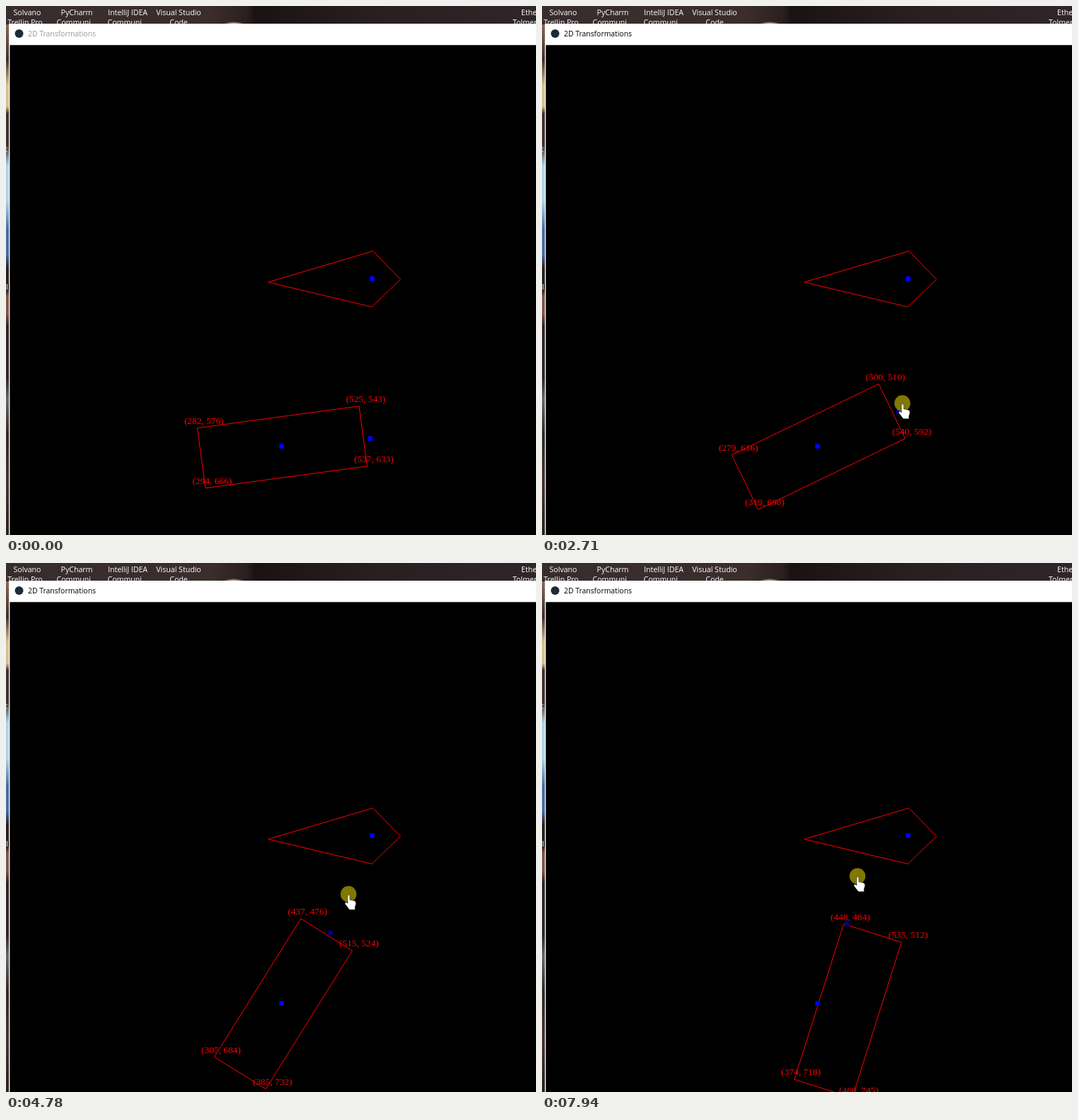
Recreate the animation shown at these times as an HTML page. Size 749 by 748 pixels, loop 8000 ms.

```html
<!DOCTYPE html>
<html lang="en">
<head>
<meta charset="utf-8">
<title>2D Transformations</title>
<style>
  html, body { margin: 0; width: 100%; height: 100%; overflow: hidden; background: #000; }
  #stage { position: relative; width: 749px; height: 748px; overflow: hidden; background: #000; }
  #desk {
    position: absolute; inset: 0 0 auto 0; height: 26px;
    background:
      radial-gradient(ellipse 16px 5px at 322px 27px, #f0dab6 30%, #f0dab600),
      linear-gradient(90deg, #382d2e, #3a2d2c 290px, #2b201f 340px, #191213 352px, #291f21 520px, #30262a);
  }
  #edge {
    position: absolute; left: 0; top: 26px; width: 4px; bottom: 0;
    background: linear-gradient(#8a6658, #40302c 50px, #d8c092 86px 116px, #40302c 126px 170px,
      #b0d4e6 200px 250px, #4a6ca0 290px 325px, #2a2222 345px 375px, #80564a 384px 410px,
      #30262a 426px 500px, #6c666a 530px, #33292a 580px, #463632 650px, #2c2220);
  }
  svg { position: absolute; left: 0; top: 0; display: block; }
  .ui { font: 10.6px "Open Sans", "Noto Sans", sans-serif; fill: #fff; }
  .mid { text-anchor: middle; }
  #title { font-size: 10.4px; animation: focus 8s step-end infinite; }
  @keyframes focus { 0% { fill: #999; } 13.75% { fill: #000; } }
  .line { fill: none; stroke: #f00; stroke-width: 1; }
  .label { font: 13.4px "Liberation Serif", "Times New Roman", serif; fill: #f00; text-anchor: middle; }
  .dot { fill: #00f; }
</style>
</head>
<body>
<div id="stage">
  <div id="desk"></div>
  <div id="edge"></div>
  <svg width="749" height="748" viewBox="0 0 749 748">
    <defs><rect id="dot" x="-3.25" y="-3.25" width="6.5" height="6.5"/></defs>
    <g class="ui">
      <g class="mid">
        <text x="30" y="13">Solvano</text><text x="27" y="27">Trellin Pro</text>
        <text x="100" y="13">PyCharm</text><text x="100" y="27">Communi...</text>
        <text x="172" y="13">IntelliJ IDEA</text><text x="172" y="27">Communi...</text>
        <text x="244" y="13">Visual Studio</text><text x="244" y="27">Code</text>
      </g>
      <text x="728" y="13">Ethe</text><text x="716" y="27">Tolmera</text>
      <text x="-3" y="206">c</text><text x="0" y="401">I</text>
    </g>
    <path fill="#fff" d="M4 25H749V55.6H5.6V748H4Z"/>
    <path d="M5.6 55.6H749V748H5.6Z"/>
    <circle cx="18.5" cy="39" r="6" fill="#1d2b3a"/>
    <text id="title" class="ui" x="31" y="43">2D Transformations</text>

    <g transform="translate(.5 .5)">
      <path class="line" d="M370 390L518 346L557 386L516.5 425Z"/>
      <use class="dot" href="#dot" x="517" y="385"/>
      <path id="box" class="line"/>
      <g id="labels"></g>
      <use class="dot" href="#dot" x="389" y="622"/>
      <use id="knob" class="dot" href="#dot"/>
    </g>
    <g id="mouse">
      <circle r="11.3" fill="#fff000" fill-opacity=".5"/>
      <path fill="#fff" stroke="#000" stroke-width=".5"
        d="M-1.3 2Q.2 0 1.9 2V8L8.5 9.5Q11 10.5 10.6 14L9.3 18V22H1.3L-4.8 14.2Q-5.8 11-2.8 11.6L-1.3 13Z"/>
    </g>
  </svg>
</div>
<script>
const LOOP = 8000, PRESS = 1100, GRAB = 1250;
const SCALE = 0.94, HALF_W = 122.7, HALF_H = 45.6;
const PIVOT = { x: 389, y: 622 };
const REST = [7.7, 409.5, 604.5];

const linear = p => p;
const easeOut = p => p * (2 - p);

// strokes of the drag: start, end, easing, then the box angle and centre reached
const strokes = [
  [GRAB, 1380, linear, 7.25, 409.5, 604.5],
  [1380, 2710, linear, 25.78, 409.8, 604],
  [2710, 4200, linear, 48.55, 409.25, 605.3],
  [4200, 5540, easeOut, 62.5, 412, 603.5],
  [5670, 6460, easeOut, 67.65, 414.5, 599.3],
  [6870, 7560, linear, 71.5, 387, 608],
  [7710, 7940, linear, 72.4, 454.1, 614.7]
];

const $ = id => document.getElementById(id);
const clamp = v => Math.min(1, Math.max(0, v));
const mix = (a, b, p) => a + (b - a) * p;
const rad = deg => deg * Math.PI / 180;
const toX = x => 5 + SCALE * x;
const toY = y => 55 + SCALE * y;

const corners = [[1, -1], [1, 1], [-1, 1], [-1, -1]];
const labels = corners.map(() => {
  const el = document.createElementNS("http://www.w3.org/2000/svg", "text");
  el.setAttribute("class", "label");
  return $("labels").appendChild(el);
});

function set(el, attrs) {
  for (const name in attrs) el.setAttribute(name, attrs[name]);
}

function pose(t) {
  return strokes.reduce((now, [from, to, ease, ...goal]) => {
    const p = ease(clamp((t - from) / (to - from)));
    return now.map((v, i) => mix(v, goal[i], p));
  }, REST);
}

function polar(reach, deg) {
  return [PIVOT.x + reach * Math.cos(rad(deg)), PIVOT.y - reach * Math.sin(rad(deg))];
}

// the pointer glides in from below, then circles the pivot while drawing away from it
function pointer(t, angle) {
  if (t < GRAB) {
    const p = easeOut(clamp(t / PRESS));
    return [mix(529, 515, p), mix(775, 606, p)];
  }
  const lead = Math.max(0, Math.sin(rad((angle - 7) * 3.2)));
  return polar(127 + 61 * clamp((angle - 20.5) / 42.5), angle + lead);
}

function drawBox(angle, cx, cy) {
  const cos = Math.cos(rad(angle)), sin = Math.sin(rad(angle));
  const points = corners.map(([u, v]) => [
    cx + u * HALF_W * cos + v * HALF_H * sin,
    cy - u * HALF_W * sin + v * HALF_H * cos
  ]);
  set($("box"), { d: "M" + points.map(([x, y]) => toX(x) + " " + toY(y)).join("L") + "Z" });
  points.forEach(([x, y], i) => {
    set(labels[i], { x: toX(x + 10), y: toY(y - 10) + 3.5 });
    labels[i].textContent = `(${Math.round(x)}, ${Math.round(y)})`;
  });
}

function draw(t) {
  const [angle, cx, cy] = pose(t);
  drawBox(angle, cx, cy);

  // the knob trails the box slightly and settles inward
  const [kx, ky] = polar(126.3 - 0.09 * angle, angle - 2.7);
  set($("knob"), { x: kx, y: ky, style: t < GRAB ? "fill:#00f" : "fill:#000090" });

  const [mx, my] = pointer(t, angle);
  set($("mouse"), { transform: `translate(${mx} ${my})` });
}

const title = $("title").getAnimations()[0];
let start;
function tick(now) {
  start ??= now;
  const t = (now - start) % LOOP;
  draw(t);
  if (title) title.currentTime = t;
  requestAnimationFrame(tick);
}
draw(0);
requestAnimationFrame(tick);
</script>
</body>
</html>
```
